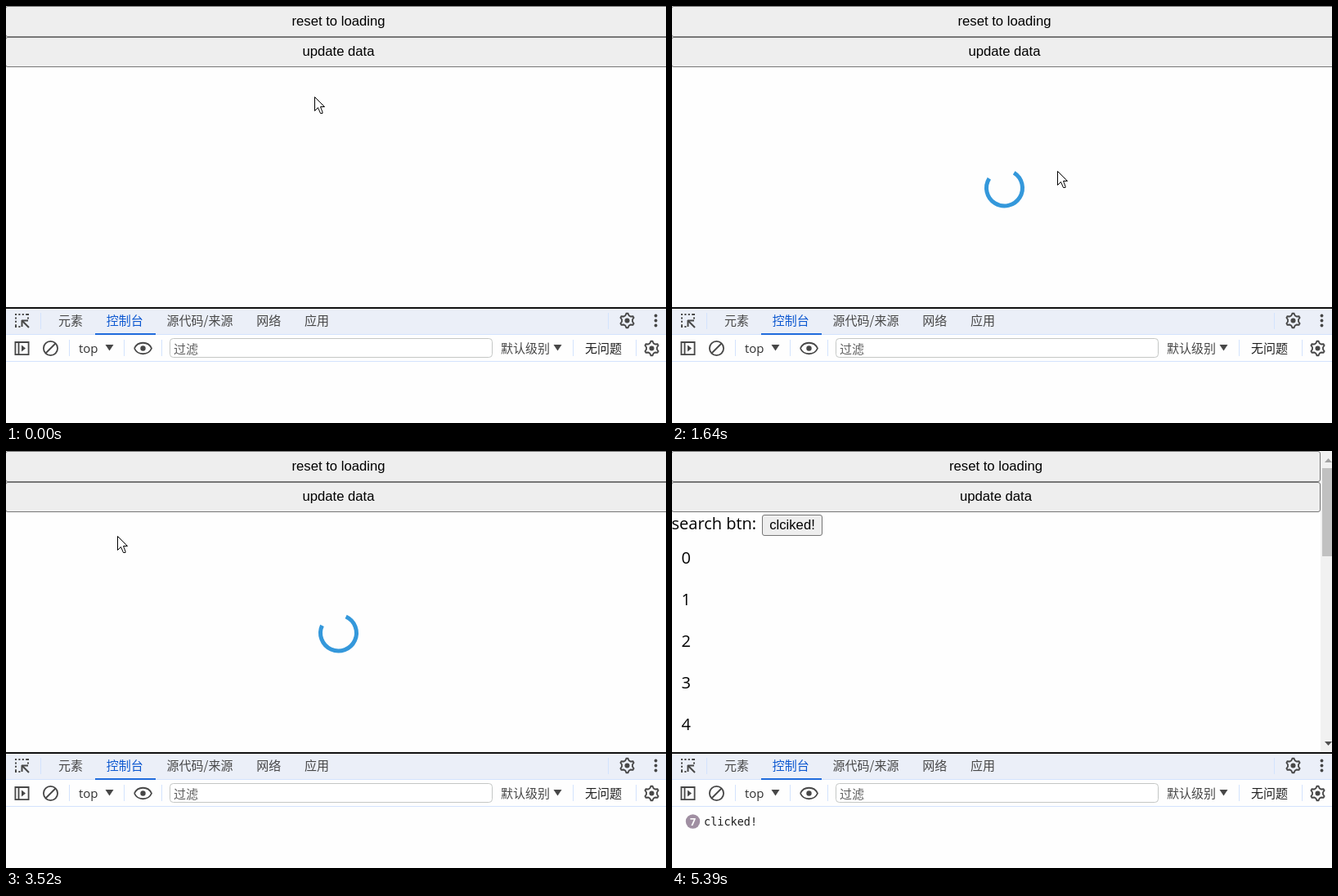
Write an HTML page with a canvas that moves like this. It is 807 px wide and 511 px high and loops after 5700 ms.

```html
<!DOCTYPE html>
<html lang="zh">
<head>
<meta charset="utf-8">
<title>Loading demo</title>
<style>
html, body { margin: 0; width: 100%; height: 100%; overflow: hidden; background: #fefefe; }
canvas { display: block; }
</style>
</head>
<body>
<canvas id="stage" width="807" height="511"></canvas>
<script>
const ctx = document.getElementById('stage').getContext('2d', { alpha: false });
const LOOP = 5700, LOADING = 670, LOADED = 3610, GONE = 5390;
const FIRST_CLICK = 4390, CLICK_GAP = 340 / 3, HOLD = 90, CLICKS = 7;
const ARIAL = '16.67px "Liberation Sans", Arial, sans-serif';
const PAGE = '20px "Open Sans", sans-serif';
const UI = '15px "Open Sans", sans-serif';
const CJK = '15px "Noto Sans CJK SC", "Noto Sans CJK", sans-serif';
const MONO = '13.5px "DejaVu Sans Mono", monospace';
const BADGE = 'bold 12.5px "Open Sans", sans-serif';
const PAPER = '#fefefe', INK = '#474747', RULE = '#d3e3fd';

// resting and turning points of the pointer: time, x, y
const path = [
  [60, 377, 111], [430, 415, 20], [760, 415, 20], [1070, 462, 119], [1250, 484, 190],
  [1820, 465, 208], [2150, 333, 164], [2410, 130, 109], [3040, 130, 107], [3610, 137, 103],
  [4060, 137, 102], [4150, 137, 88], [5080, 137, 88], [5250, 689, 419], [GONE, 735, 511]
];

function pointerAt(t) {
  const next = path.findIndex(p => p[0] > t);
  const b = path[next], a = path[Math.max(next - 1, 0)];
  const f = a === b ? 0 : (t - a[0]) / (b[0] - a[0]);
  return { x: Math.round(a[1] + (b[1] - a[1]) * f), y: Math.round(a[2] + (b[2] - a[2]) * f) };
}

function clicksBy(t) {
  const n = Math.floor((t - FIRST_CLICK) / CLICK_GAP + 1e-6) + 1;
  return Math.min(Math.max(n, 0), CLICKS);
}

function text(str, x, y, font, color = '#000', align = 'left') {
  ctx.font = font;
  ctx.fillStyle = color;
  ctx.textAlign = align;
  ctx.fillText(str, x, y);
}

function rect(x, y, w, h, color) {
  ctx.fillStyle = color;
  ctx.fillRect(x, y, w, h);
}

function paint(fill, stroke, width) {
  if (fill) { ctx.fillStyle = fill; ctx.fill(); }
  if (stroke) { ctx.strokeStyle = stroke; ctx.lineWidth = width; ctx.stroke(); }
}

function poly(points, fill, stroke, width = 1) {
  ctx.beginPath();
  points.forEach(([x, y]) => ctx.lineTo(x, y));
  ctx.closePath();
  paint(fill, stroke, width);
}

function line(x1, y1, x2, y2, width = 1.8) {
  ctx.beginPath();
  ctx.moveTo(x1, y1);
  ctx.lineTo(x2, y2);
  paint(null, INK, width);
}

function circle(x, y, r, fill, stroke) {
  ctx.beginPath();
  ctx.arc(x, y, r, 0, Math.PI * 2);
  paint(fill, stroke, 1.8);
}

function box(x, y, w, h, r, fill, stroke) {
  ctx.beginPath();
  ctx.roundRect(x + 0.5, y + 0.5, w - 1, h - 1, r);
  paint(fill, stroke, 1);
}

// triangle with a level side at y and its tip at y + h
function triangle(cx, y, halfWidth, h, color) {
  poly([[cx - halfWidth, y], [cx + halfWidth, y], [cx, y + h]], color);
}

function button(label, x, y, w, h, baseline, mouse, down) {
  const over = mouse && mouse.x >= x && mouse.x < x + w && mouse.y >= y && mouse.y < y + h;
  const [fill, edge] = over && down ? ['#f5f5f5', '#8d8d8d']
    : over ? ['#e5e5e5', '#4f4f4f'] : ['#eeeeee', '#767676'];
  box(x, y, w, h, 2.5, fill, edge);
  text(label, x + w / 2, baseline, ARIAL, '#000', 'center');
}

function spinner(t) {
  const gap = (41 + 0.379 * (t - 1070)) * Math.PI / 180;
  ctx.beginPath();
  ctx.arc(406.5, 223, 22, gap + Math.PI / 4, gap + Math.PI * 7 / 4);
  paint(null, '#3498db', 5);
}

function scrollbar() {
  rect(793, 0, 14, 369, '#f1f1f1');
  rect(795, 21, 12, 108, '#c1c1c1');
  triangle(802.5, 14, 4.5, -5, '#a3a3a3');
  triangle(802.5, 356, 4.5, 5, '#505050');
}

function gear(cx, cy) {
  const points = [];
  for (let i = 0; i < 24; i++) {
    const tooth = Math.floor(i / 4), corner = i % 4;
    const a = tooth * Math.PI / 3 - Math.PI / 2 + (corner - 1.5) * 0.23;
    const r = corner === 1 || corner === 2 ? 8.8 : 6.6;
    points.push([cx + r * Math.cos(a), cy + r * Math.sin(a)]);
  }
  poly(points, null, INK, 1.8);
  circle(cx, cy, 3, INK);
}

function inspectIcon() {
  ctx.setLineDash([2, 2.4]);
  line(11, 378, 28, 378, 2);
  line(12, 377, 12, 394, 2);
  line(27, 377, 27, 384, 2);
  line(11, 393, 19, 393, 2);
  ctx.setLineDash([]);
  line(20, 386, 28, 394, 2);
  line(19, 385.5, 27, 385.5, 2);
  line(19.5, 385, 19.5, 393, 2);
}

function sidebarIcon() {
  ctx.beginPath();
  ctx.rect(11.4, 412, 16.2, 15.2);
  paint(null, INK, 1.8);
  line(15.5, 412, 15.5, 427);
  poly([[19, 415.5], [19, 423.5], [24, 419.5]], INK);
}

function eyeIcon() {
  ctx.beginPath();
  ctx.moveTo(157, 419.5);
  ctx.bezierCurveTo(161, 410.5, 174, 410.5, 178, 419.5);
  ctx.bezierCurveTo(174, 428.5, 161, 428.5, 157, 419.5);
  paint(null, INK, 1.8);
  circle(167.5, 419.5, 3.2, INK);
}

function tabs() {
  rect(0, 369, 807, 2, '#111');
  rect(0, 371, 807, 31, '#ebeff8');
  rect(0, 402, 807, 1, RULE);
  rect(109, 401, 74, 2, '#1f6bdc');
  inspectIcon();
  let x = 64;
  for (const label of ['元素', '控制台', '源代码/来源', '网络', '应用']) {
    text(label, x, 391, CJK, label === '控制台' ? '#0b57d0' : INK);
    x += ctx.measureText(label).width + 28.8;
  }
  for (const rule of [42, 736]) rect(rule, 376, 1, 20, RULE);
  gear(759.5, 385.5);
  for (let i = -1; i < 2; i++) circle(794.5, 385.5 + 6 * i, 1.9, INK);
}

function toolbar() {
  rect(0, 435, 807, 1, RULE);
  sidebarIcon();
  circle(54.5, 419.5, 8.6, null, INK);
  line(48.5, 425.5, 60.5, 413.5);
  text('top', 89, 425, UI, '#303030');
  triangle(126.5, 415, 5, 7.5, INK);
  eyeIcon();
  box(200, 407, 395, 24, 4, '#fff', '#c4c7c5');
  text('过滤', 205, 425.5, CJK, '#5f5f5f');
  text('默认级别', 605, 425, CJK, INK);
  triangle(674.5, 415, 5, 7.5, INK);
  text('无问题', 708, 425, CJK, '#1f1f1f');
  for (const rule of [77, 144, 190, 693, 770]) rect(rule, 409, 1, 20, RULE);
  gear(789.5, 419.5);
}

function consoleLog(count) {
  if (!count) return;
  if (count > 1) {
    circle(25.5, 454, 8.7, '#a08fa2');
    text(count, 25.5, 458.5, BADGE, '#fff', 'center');
  }
  text('clicked!', count > 1 ? 39 : 34, 458.5, MONO, '#1f1f1f');
}

function arrow({ x, y }) {
  const shape = [[0, 0], [0, 17], [4, 13], [7, 20], [9.5, 20], [9.5, 18.5], [7, 12], [12, 12]];
  poly(shape.map(([dx, dy]) => [x + dx + 0.5, y + dy + 0.5]), '#fff', '#000');
}

function draw(t) {
  // the screen refreshes every 30 ms
  const base = t < 2430 ? 20 : 10;
  const tick = Math.floor((t - base) / 30 + 1e-6) * 30 + base;
  const mouse = t < GONE && pointerAt(tick);
  const loaded = t >= LOADED;
  const left = -1, width = loaded ? 794 : 815;
  const count = clicksBy(t);

  rect(0, 0, 807, 511, PAPER);
  button('reset to loading', left, 0, width, 38, 24, mouse, t >= 550 && t < LOADING);
  button('update data', left, 38, width, 37, 61, mouse, false);
  if (loaded) {
    text('search btn:', -0.5, 96, PAGE);
    button('clciked!', 110, 78, 74, 26, 96, mouse, clicksBy(t + HOLD) > count);
    for (let i = 0; i < 5; i++) text(i, 11.5, 138 + 51 * i, PAGE);
    scrollbar();
  } else if (t >= LOADING) {
    spinner(tick);
  }
  tabs();
  toolbar();
  consoleLog(count);
  if (mouse) arrow(mouse);
}

const start = performance.now();
function frame() {
  draw((performance.now() - start) % LOOP);
  requestAnimationFrame(frame);
}
frame();
</script>
</body>
</html>
```
